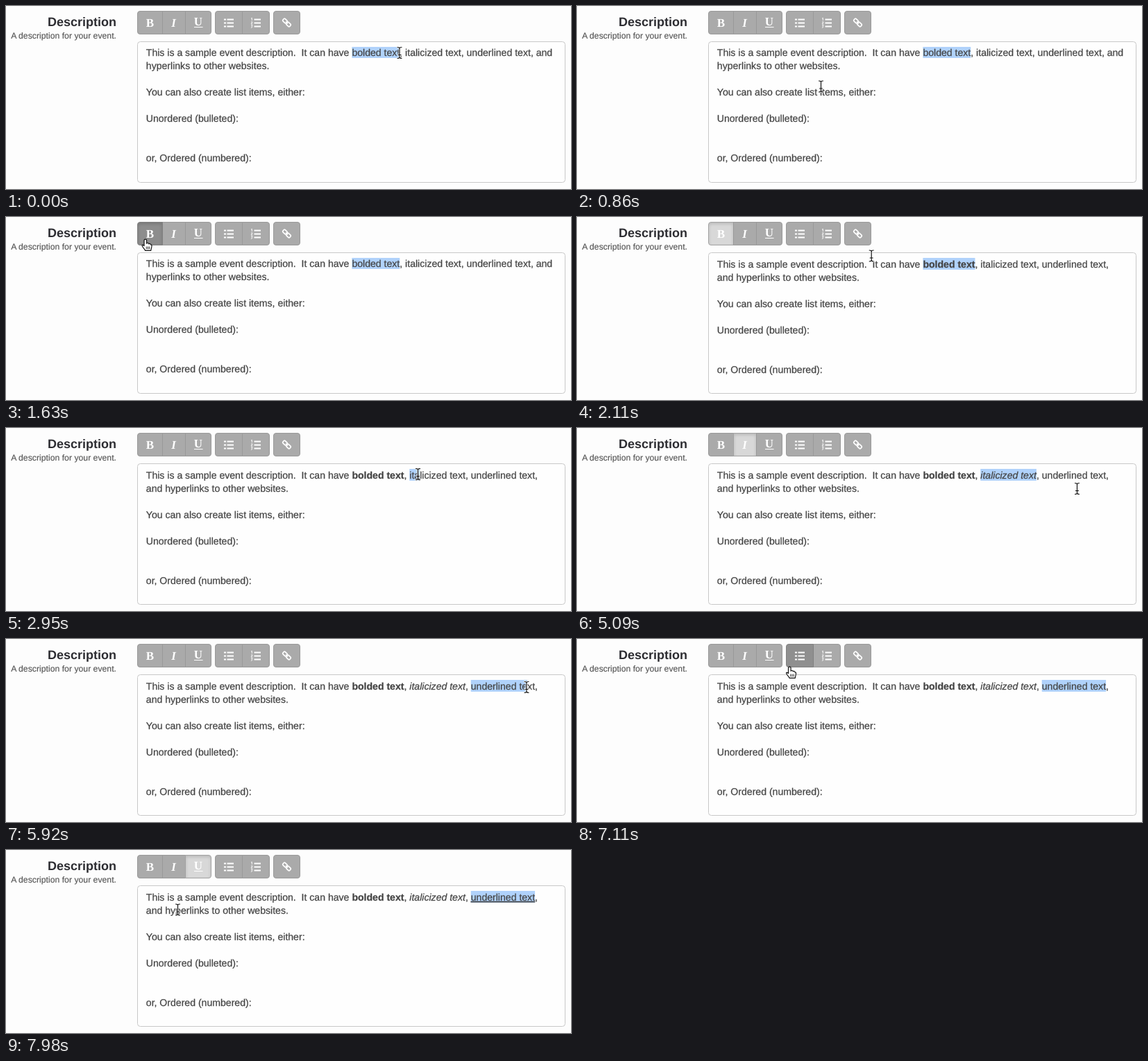
Write an HTML page that moves like this. It is 814 px wide and 264 px high and loops after 8 s.

```html
<!DOCTYPE html>
<html lang="en">
<head>
<meta charset="utf-8">
<title>Description editor</title>
<style>
  html, body { margin: 0; width: 100%; height: 100%; overflow: hidden; background: #fdfdfd; }
  .stage { position: absolute; left: 0; top: 0; width: 814px; height: 264px; overflow: hidden; }
  .button {
    position: absolute; top: 7px; left: var(--x); width: var(--w); height: 34px;
    box-sizing: border-box; border: 1px solid #999; background: #aaa;
  }
  .first { border-top-left-radius: 4px; border-bottom-left-radius: 4px; }
  .last { border-top-right-radius: 4px; border-bottom-right-radius: 4px; }
  .hover { z-index: 1; background: #8f8f8f; border-color: #808080; }
  .pressed { background: #8d8d8d; box-shadow: inset 0 2px 4px rgba(0, 0, 0, .16); }
  .on { background: #d8d8d8; border-color: #a2a2a2; box-shadow: inset 0 2px 4px rgba(0, 0, 0, .15); }
  svg { position: absolute; left: 0; top: 0; z-index: 2; }
  text { font-family: "Liberation Sans", Arial, sans-serif; text-rendering: geometricPrecision; }
  .copy { font-size: 14.09px; fill: #444; }
  .copy text { stroke: #444; stroke-width: .25px; }
  .title { font-size: 18px; font-weight: bold; fill: #2d2d32; text-anchor: end; }
  .hint { font-size: 12.25px; fill: #555; stroke: #555; stroke-width: .15px; text-anchor: end; }
  .glyph { font: bold 17px "Liberation Serif", serif; fill: #fff; text-anchor: middle; }
  .bold { font-weight: bold; }
  .italic { font-style: italic; }
  .underline { text-decoration: underline; }
</style>
</head>
<body>
<div class="stage">
  <div class="button first" style="--x:189px;--w:37px"></div>
  <div class="button" style="--x:225px;--w:34px"></div>
  <div class="button last" style="--x:258px;--w:38px"></div>
  <div class="button first" style="--x:301px;--w:40px"></div>
  <div class="button last" style="--x:340px;--w:40px"></div>
  <div class="button first last" style="--x:385px;--w:39px"></div>

  <svg width="814" height="264" viewBox="0 0 814 264">
    <text class="title" x="159" y="29">Description</text>
    <text class="hint" x="159" y="47">A description for your event.</text>

    <text class="glyph" x="207.5" y="29.5">B</text>
    <text class="glyph italic" x="241.5" y="29.5">I</text>
    <text class="glyph" x="277" y="28">U</text>
    <path d="M271 30.5H283.5" stroke="#fff"/>
    <g stroke="#fff" stroke-width="2">
      <path d="M314 19.5h3M314 24.5h3M314 29.5h3M318.5 19.5h9.5M318.5 24.5h9.5M318.5 29.5h9.5"/>
      <path d="M357.5 19.5h9.5M357.5 24.5h9.5M357.5 29.5h9.5"/>
      <path d="M353 18l1.3-.8V21M353 23h2.3l-2.3 3h2.5M353 28h2.3l-1.2 1.5q2 1-1.2 2" fill="none" stroke-width=".9"/>
      <g fill="none" stroke-width="1.7">
        <rect x="-3.3" y="-2.3" width="6.6" height="4.6" rx="1.8" transform="translate(402 21.5) rotate(45)"/>
        <rect x="-3.3" y="-2.3" width="6.6" height="4.6" rx="1.8" transform="translate(407 26.5) rotate(45)"/>
        <path d="M403 22.5l3 3" stroke-width="1.4"/>
      </g>
    </g>

    <rect x="189.5" y="51.5" width="616" height="203" rx="4" fill="#fefefe" stroke="#c8c8c8"/>
    <rect id="selection" y="59" fill="#b0d2fb"/>
    <g id="copy" class="copy">
      <text x="201.8" y="72">This is a sample event description.&#160; It can have <tspan class="word">bolded text</tspan>, <tspan class="word">italicized text</tspan>, <tspan class="word">underlined text</tspan>,<tspan id="tail"> and</tspan></text>
      <text x="201.8" y="91"><tspan id="head"></tspan>hyperlinks to other websites.</text>
      <text x="201.8" y="129">You can also create list items, either:</text>
      <text x="201.8" y="167">Unordered (bulleted):</text>
      <text x="201.8" y="224">or, Ordered (numbered):</text>
    </g>

    <defs>
      <path id="beamShape" d="M-3-8Q0-8 0-6.3Q0-8 3-8M0-6.3V6.3M-3 8Q0 8 0 6.3Q0 8 3 8M-2 3H2"/>
    </defs>
    <g id="cursor" fill="none" stroke-linecap="round" stroke-linejoin="round">
      <g id="beam">
        <use href="#beamShape" stroke="#fff" stroke-width="2.6"/>
        <use href="#beamShape" stroke="#111" stroke-width="1.2"/>
      </g>
      <path id="arrow" d="M0 0V14L3.2 11L5.4 16L7.6 15L5.4 10.2H10Z" fill="#111" stroke="#fff"/>
      <g id="hand" stroke="#111">
        <path d="M-2 2C-2-.4 1.6-.4 1.6 2V6.2C2.6 5 4.6 5.4 4.8 6.8C6 6 7.2 6.6 7.4 7.9C8.4 7.4 9 8.4 9 9.5C9 12 8.2 13 7.8 16.3H-.5C-1.5 13.5-5 11.5-5 9C-4.6 7.6-3 8.4-2 9.6Z" fill="#fff" stroke-width="1.2"/>
        <path d="M1.3 11V14M3.5 11V14M5.7 11V14" stroke-width=".9"/>
      </g>
    </g>
  </svg>
</div>

<script>
const LOOP = 8000;
const byId = id => document.getElementById(id);
const buttons = [...document.querySelectorAll('.button')];
const words = [...document.querySelectorAll('.word')];
const styles = ['bold', 'italic', 'underline'];

// Button press, style applied, style button released (ms).
const clicks = [[1630, 1720, 2800], [4510, 4550, 5720], [7610, 7650, LOOP]];
// Drag over a word: start, end (ms).
const drags = [[-1000, 170], [2800, 3290], [5720, 6270]];

// Pointer moves: start, end (ms), target x, y, optional curve control x, y.
const origin = [567, 67.5];
const moves = [
  [440, 1210, 201, 32, 370, 190],
  [1780, 2380, 579.5, 63, 400, 60],
  [2440, 2620, 579.5, 66.5],
  [2830, 3290, 661.5, 67],
  [3710, 4230, 228, 41.5, 400, 170],
  [4230, 4510, 236, 33, 222, 42],
  [4580, 4910, 720.5, 87.5],
  [5090, 5540, 670.5, 69.5],
  [5720, 5920, 750, 69.5],
  [5920, 6270, 761.5, 69],
  [6630, 7110, 306.5, 40, 520, 131],
  [7110, 7430, 270, 33, 285, 42],
  [7690, 7980, 247.5, 86]
];

const ease = u => u * u * (3 - 2 * u);

function pointerAt(t) {
  let [x, y] = origin;
  for (const [start, end, tx, ty, cx = (x + tx) / 2, cy = (y + ty) / 2] of moves) {
    if (t < start) break;
    const u = ease(Math.min(1, (t - start) / (end - start)));
    const curve = (a, c, b) => (1 - u) ** 2 * a + 2 * u * (1 - u) * c + u * u * b;
    [x, y] = [curve(x, cx, tx), curve(y, cy, ty)];
  }
  return { x, y };
}

function showSelection(t, x) {
  const index = drags.findLastIndex(([start]) => t >= start);
  const word = words[index];
  const count = word.textContent.length;
  const left = word.getStartPositionOfChar(0).x;
  let right = word.getEndPositionOfChar(count - 1).x;
  if (t < drags[index][1]) {
    let nearest = left;
    for (let i = 0; i < count; i++) {
      const edge = word.getEndPositionOfChar(i).x;
      if (Math.abs(edge - x) < Math.abs(nearest - x)) nearest = edge;
    }
    right = nearest;
  }
  byId('selection').setAttribute('x', left);
  byId('selection').setAttribute('width', right - left);
}

function showButtons(t, { x, y }) {
  buttons.forEach((button, i) => {
    const left = button.offsetLeft;
    const [press, apply, release] = clicks[i] || [LOOP, LOOP, LOOP];
    const on = t >= apply && t < release;
    button.classList.toggle('on', on);
    button.classList.toggle('pressed', t >= press && t < apply);
    button.classList.toggle('hover', !on && y < 41 && x >= left && x < left + button.offsetWidth - 1);
  });
}

function showCursor({ x, y }) {
  const shape = y < 45 ? 'hand' : y < 51 ? 'arrow' : 'beam';
  for (const id of ['hand', 'arrow', 'beam']) byId(id).style.display = id === shape ? '' : 'none';
  byId('cursor').setAttribute('transform', `translate(${x.toFixed(1)} ${y.toFixed(1)})`);
}

function setText(id, value) {
  if (byId(id).textContent !== value) byId(id).textContent = value;
}

function render(t) {
  const pointer = pointerAt(t);
  words.forEach((word, i) => word.classList.toggle(styles[i], t >= clicks[i][1]));

  // Bold text wraps the last word and makes the first line 1px taller.
  const wrapped = t >= clicks[0][1];
  setText('tail', wrapped ? '' : ' and');
  setText('head', wrapped ? 'and ' : '');
  byId('copy').setAttribute('transform', `translate(0 ${wrapped ? 1 : 0})`);
  byId('selection').setAttribute('height', wrapped ? 17 : 16);

  showSelection(t, pointer.x);
  showButtons(t, pointer);
  showCursor(pointer);
}

const began = performance.now();
function tick() {
  render((performance.now() - began) % LOOP);
  requestAnimationFrame(tick);
}
tick();
</script>
</body>
</html>
```
